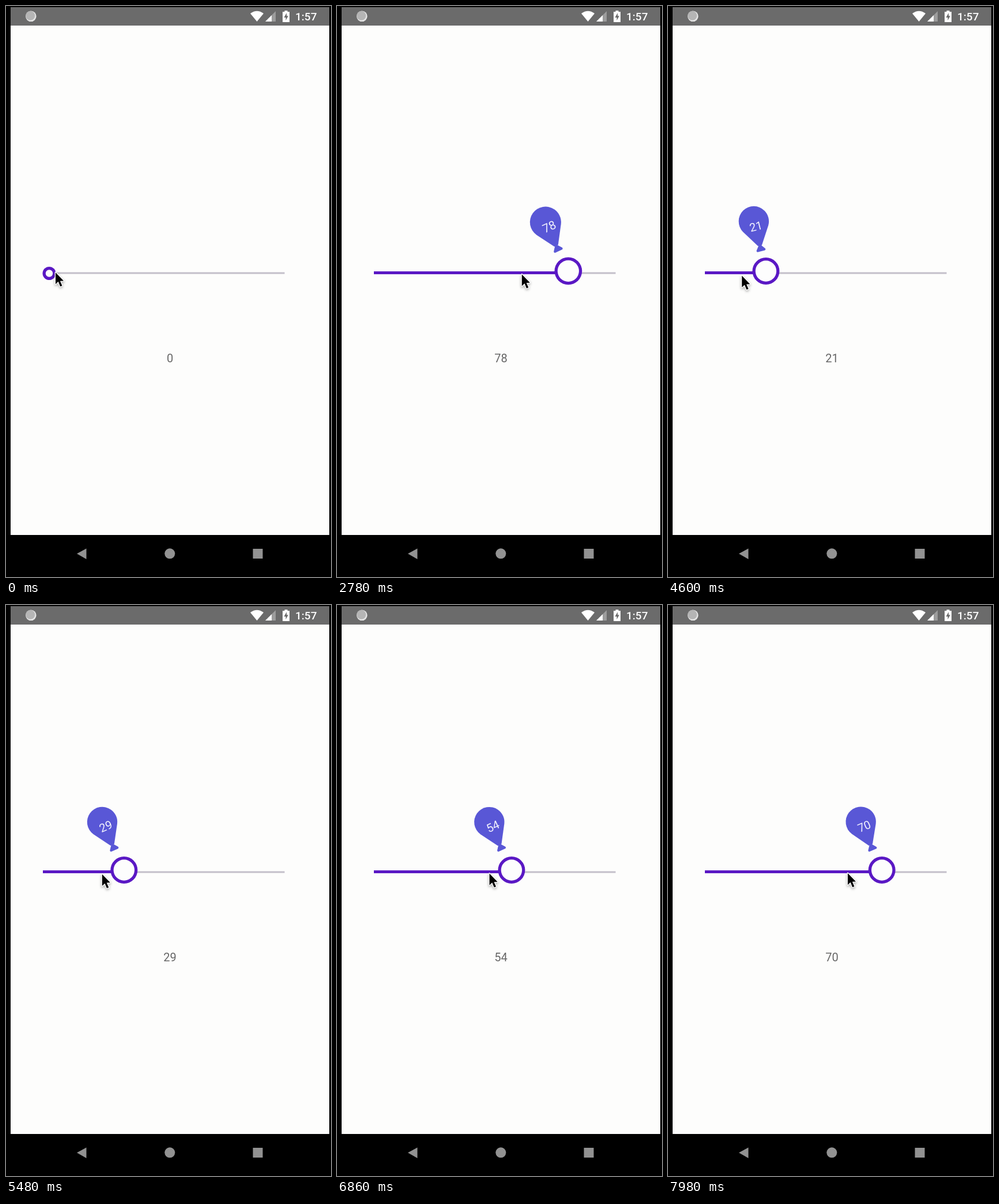
Write an HTML page with a canvas that moves like this. It is 564x992 px and loops after 8 s.

```html
<!DOCTYPE html>
<html lang="en">
<head>
<meta charset="utf-8">
<title>Balloon slider</title>
<style>
  html, body { margin: 0; width: 100%; height: 100%; overflow: hidden; background: #000; }
  canvas { display: block; width: 564px; height: 992px; }
</style>
</head>
<body>
<canvas id="stage" width="564" height="992"></canvas>
<script>
const ctx = document.getElementById('stage').getContext('2d');
const LOOP = 8000;
const PRESS = 2100;
const PURPLE = '#5a18c4';
const BALLOON = '#5957d6';
const GRAY = '#929292';
const BAR = '#6b6b6b';

// Sine ease from 0 to 1 between two times
function ease(t, from, to) {
  const u = Math.min(1, Math.max(0, (t - from) / (to - from)));
  return Math.sin(u * Math.PI / 2) ** 2;
}

// Drag right, back left, then slowly right again
const thumbX = t => 75
  + 376.6 * ease(t, 2080, 3000)
  - 285.4 * ease(t, 3000, 4300)
  + 223.5 * ease(t, 4220, 8840);

const pointerX = t => 85
  + 348 * ease(t, 1260, 1940)
  - 310 * ease(t, 2213, 3588)
  + 189.6 * ease(t, 4220, 8220);

const pointerY = t => 461 + 6 * ease(t, 2000, 3500) - 3 * ease(t, 3600, 7900);

function rect(color, x, y, w, h) {
  ctx.fillStyle = color;
  ctx.fillRect(x, y, w, h);
}

function disc(color, x, y, r) {
  ctx.fillStyle = color;
  ctx.beginPath();
  ctx.arc(x, y, r, 0, Math.PI * 2);
  ctx.fill();
}

function shape(color, path) {
  ctx.fillStyle = color;
  ctx.fill(new Path2D(path));
}

function label(text, x, y, font, color, align = 'center') {
  ctx.font = font + ' Roboto, sans-serif';
  ctx.fillStyle = color;
  ctx.textAlign = align;
  ctx.fillText(text, x, y);
}

function drawStatusBar() {
  rect(BAR, 8, 2, 553, 32);
  disc('#e4e4e4', 43.3, 17.8, 9.3);
  disc('#b5b5b5', 42.3, 16.8, 8);
  shape('#fff', 'M435.5 27L424 13Q435.5 4.5 447 13Z');
  shape('#9c9c9c', 'M450 27L468 9V27Z');
  shape('#fff', 'M450 27L461 16V27Z');
  rect('#fff', 480, 10, 12, 18);
  rect('#fff', 483.5, 8, 5, 3);
  shape(BAR, 'M487 12L482.5 20H485.5V25L489.8 17.3H487Z');
  label('1:57', 502, 25, '500 19px', '#fff', 'left');
}

function drawNavBar() {
  shape(GRAY, 'M123 951.5L139.5 942.5V961Z');
  disc(GRAY, 284.3, 951.3, 9);
  rect(GRAY, 428.5, 943, 17, 17);
}

function drawSlider(x, grow) {
  const y = 464.5 - 4 * grow;
  const r = 11.5 + 12 * grow;
  rect('#c3bfca', 64, 462.5, 419.5, 3);
  rect(PURPLE, 64, 461, x - 64, 5);
  disc(PURPLE, x, y, r);
  disc('#fdfdfd', x, y, r - 5.3);
}

function drawBalloon(x, lean, scale, value) {
  if (scale <= 0) return;
  const top = -51.5;
  ctx.save();
  ctx.translate(x + 3.75 - 21.2 * lean, 424);
  ctx.rotate(-lean * 24.5 * Math.PI / 180);
  ctx.scale(scale, scale);

  ctx.fillStyle = BALLOON;
  ctx.beginPath();
  ctx.arc(0, top, 26.2, Math.PI - 0.53, 0.53);
  ctx.lineTo(3.5, -8);
  ctx.lineTo(-3.5, -8);
  ctx.fill();

  const knot = new Path2D('M0 -8L6 0H-6Z');
  ctx.strokeStyle = BALLOON;
  ctx.lineWidth = 4;
  ctx.lineJoin = 'round';
  ctx.fill(knot);
  ctx.stroke(knot);

  label(value, 2.5 * lean, top + 16.5, '20px', '#f1f1fd');
  ctx.restore();
}

function drawPointer(x, y) {
  const arrow = new Path2D('M0 0V23L5.3 18L9.3 27.5L13 26L9 16.8L16 16.5Z');
  ctx.save();
  ctx.translate(x + 1, y + 2);
  ctx.scale(0.88, 0.88);
  ctx.lineJoin = 'round';
  ctx.lineWidth = 3;
  ctx.strokeStyle = '#fff';
  ctx.shadowColor = 'rgba(0,0,0,.35)';
  ctx.shadowBlur = 4;
  ctx.shadowOffsetY = 2;
  ctx.stroke(arrow);
  ctx.shadowColor = 'transparent';
  ctx.fillStyle = '#000';
  ctx.fill(arrow);
  ctx.restore();
}

function draw(t) {
  const x = thumbX(t);
  const speed = (x - thumbX(t - 120)) / 0.12;
  const lean = Math.tanh(speed / 25);
  const u = Math.max(0, t - PRESS) / 1000;
  const grow = 1 - Math.exp(-5 * u) * Math.cos(5 * u);
  const value = Math.max(0, Math.floor((x - 84.8) / 4.035));

  rect('#000', 0, 0, 564, 992);
  rect('#fdfdfc', 8, 34, 553, 885);
  drawStatusBar();
  drawNavBar();
  drawSlider(x, grow);
  drawBalloon(x, lean, grow, value);
  label(value, 284.5, 619, '20px', '#666');
  drawPointer(pointerX(t), pointerY(t));
}

const start = performance.now();
function tick() {
  draw((performance.now() - start) % LOOP);
  requestAnimationFrame(tick);
}
tick();
</script>
</body>
</html>
```
